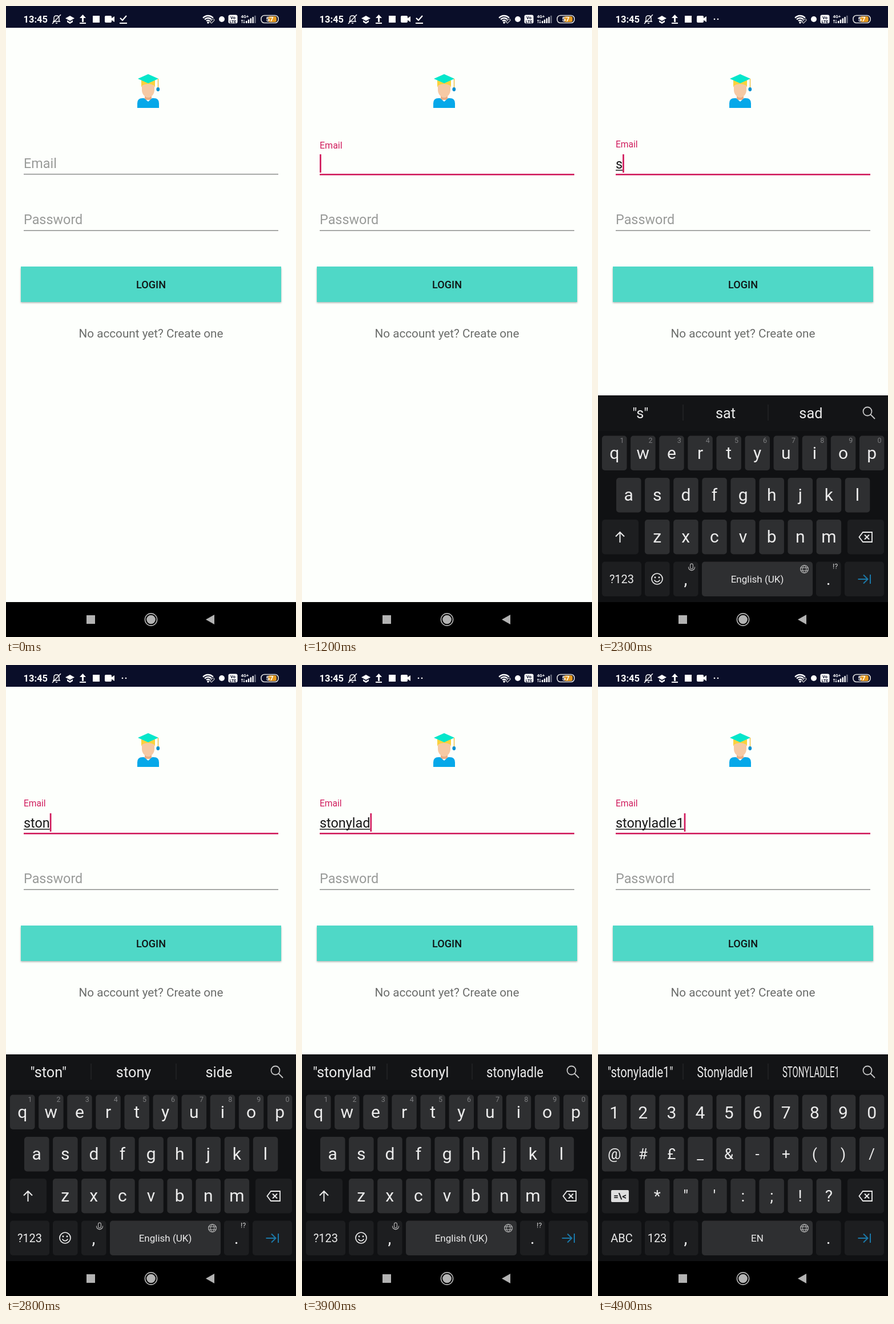
Write an HTML page with a canvas that moves like this. It is 508 px wide and 1102 px high and loops after 5000 ms.

```html
<!DOCTYPE html>
<html lang="en">
<head>
<meta charset="utf-8">
<title>Login</title>
<style>
html, body { margin: 0; width: 100%; height: 100%; overflow: hidden; background: #fdfffc; }
canvas { display: block; }
</style>
</head>
<body>
<canvas id="stage" width="508" height="1102"></canvas>
<script>
const ctx = document.getElementById('stage').getContext('2d');
const LOOP = 5000, STEP = 100;
const PINK = '#d01a5c', WHITE = '#fff', KEY = '#2e2f31', DARK_KEY = '#1d1e20', LETTER = '#ececec';
const WORD = 'stonyladle1';
const TYPED_AT = [2200, 2500, 2600, 2800, 3000, 3200, 3500, 3900, 4100, 4400, 4900];
const FOCUS = 1075, KEYBOARD = 1300, DOTS = 2100, SYMBOLS = 4600;

function text(s, x, y, size, color, align = 'left', weight = 400) {
  ctx.font = `${weight} ${size}px Roboto, sans-serif`;
  ctx.textAlign = align;
  ctx.fillStyle = color;
  ctx.fillText(s, x, y);
}
const center = (s, x, y, size, color = LETTER, weight) => text(s, x, y, size, color, 'center', weight);

function rect(x, y, w, h, color) {
  ctx.fillStyle = color;
  ctx.fillRect(x, y, w, h);
}
function fill(d, color) {
  ctx.fillStyle = color;
  ctx.fill(new Path2D(d));
}
function stroke(d, color, width = 2) {
  ctx.strokeStyle = color;
  ctx.lineWidth = width;
  ctx.stroke(new Path2D(d));
}
function box(x, y, w, h, r, color) {
  ctx.beginPath();
  ctx.roundRect(x, y, w, h, r);
  ctx.fillStyle = color;
  ctx.fill();
}
function circle(x, y, r, color, lineWidth) {
  ctx.beginPath();
  ctx.arc(x, y, r, 0, 7);
  ctx.fillStyle = ctx.strokeStyle = color;
  ctx.lineWidth = lineWidth;
  lineWidth ? ctx.stroke() : ctx.fill();
}

function statusBar(t) {
  rect(0, 0, 508, 38, '#0a0e29');
  text('13:45', 30.5, 29, 16.5, WHITE, 'left', 700);
  stroke('M82 27H95M84 27V21Q84 17 88.500 17Q93 17 93 21V27M87 30H90M81 31L96 15', WHITE, 1.4);
  fill('M104 21.500L112 17L120 21.500L112 26ZM107 25L112 28L117 25V28L112 31L107 28Z', WHITE);
  fill('M134.500 15L140 21H136V28H133V21H129ZM129 29H140V31H129Z', WHITE);
  box(152, 17, 12, 12, 0, WHITE);
  box(173, 17, 12, 12, 2, WHITE);
  fill('M184 22L190 18V28L184 24Z', WHITE);
  if (t < DOTS) stroke('M200 21L204 25L211 17M199 30H212', WHITE, 2.2);
  else [204, 210].forEach(x => circle(x, 23, 1.3, WHITE));

  for (const r of [4, 8, 12]) {
    ctx.beginPath();
    ctx.arc(354, 29, r, -2.4, -0.75);
    ctx.strokeStyle = WHITE;
    ctx.lineWidth = 2.4;
    ctx.stroke();
  }
  circle(354, 29, 1.8, WHITE);
  stroke('M357 28L362 23Q365 22 365 25L360 30Z', '#ccc', 1.1);
  circle(378, 23, 5, WHITE);
  box(389.5, 15.5, 16, 15, 3, WHITE);
  center('Vo', 397.5, 22.5, 7.5, '#0a0e29', 700);
  center('LTE', 397.5, 29.5, 7, '#0a0e29', 700);
  text('4G+', 411.5, 21, 7.5, WHITE, 'left', 700);
  stroke('M413.500 24V30M412 26L413.500 24L415 26M417 24V30M415.500 28L417 30L418.500 28', WHITE, 0.9);
  for (let i = 0; i < 5; i++) {
    const h = 4 + i * 2.3;
    rect(420 + i * 3.8, 30 - h, 2.4, h, i < 4 ? WHITE : '#6c6f80');
  }
  box(459, 18, 15, 10, 3, '#e59a20');
  ctx.beginPath();
  ctx.roundRect(447, 16.5, 30, 13, 5.5);
  ctx.strokeStyle = '#ddd';
  ctx.lineWidth = 1.6;
  ctx.stroke();
  center('57', 462, 27.2, 11.5, WHITE, 700);
}

function graduate() {
  fill('M237 130H261V140L259 144H239L237 140Z', '#fbd23c');
  fill('M243 152H255V164H243Z', '#e9ad86');
  fill('M238 139Q249 133 260 139V147C260 154 254 160 249 160C244 160 238 154 238 147Z', '#f6c9a4');
  fill('M230 178V170Q230 161 239 161H242L249 167L256 161H259Q268 161 268 170V178Z', '#06a8e9');
  fill('M249 119L267 127L249 135L231 127Z', '#05e6cb');
  stroke('M266.500 127V144', '#edbd3d', 1.4);
  ctx.beginPath();
  ctx.ellipse(266.3, 145.5, 2.9, 3.4, 0, 0, 7);
  ctx.fillStyle = '#0790cf';
  ctx.fill();
}

function emailField(t, typed) {
  const focused = t >= FOCUS;
  const p = Math.min(1, Math.max(0, (t - FOCUS) / 167));
  const lift = p * p * (3 - 2 * p) * (1 - p) + (1 - (1 - p) ** 3) * p;
  text('Email', 31, 282.5 - 35.5 * lift, 23.4 - 7.8 * lift, focused ? PINK : '#999b99');
  if (!focused) return rect(31, 293, 446, 1.4, '#858785');

  rect(31, 293, 446, 2.6, PINK);
  text(typed, 31, 284, 23.4, '#161616');
  const width = ctx.measureText(typed).width;
  rect(31, 286, width, 1.5, '#161616');
  const blinkedOff = t >= 1600 && t < 2100;
  if (!blinkedOff) rect(31 + width, 259, 2.7, 32, PINK);
}

function form(t, typed) {
  rect(0, 38, 508, 1003, '#fdfffc');
  graduate();
  emailField(t, typed);
  text('Password', 31, 381, 23.4, '#999b99');
  rect(31, 391.5, 446, 1.4, '#858785');
  ctx.save();
  ctx.shadowColor = 'rgba(0,0,0,.3)';
  ctx.shadowBlur = 3;
  ctx.shadowOffsetY = 1.5;
  rect(26, 455, 456, 62, '#4fd8c7');
  ctx.restore();
  center('LOGIN', 254, 493, 18.1, '#101414', 500);
  center('No account yet? Create one', 254, 578.5, 20.7, '#6b6d6b');
}

function suggestions(typed) {
  const n = typed.length;
  if (n > 9) {
    const capital = typed[0].toUpperCase() + typed.slice(1);
    return [capital, typed.toUpperCase()];
  }
  const early = [['sat', 'sad'], ['still', 'stay'], ['stop', 'story'], [WORD.slice(0, 5), 'side']];
  return early[n - 1] || [WORD.slice(0, 6), WORD.slice(0, 10)];
}

function microphone(x, y, k, color) {
  ctx.save();
  ctx.translate(x, y);
  ctx.scale(k, k);
  stroke('M-4 -6A4 4 0 0 1 4 -6V1A4 4 0 0 1 -4 1ZM-9 -1V1A9 8 0 0 0 9 1V-1M0 9V11', color, 1.7);
  ctx.restore();
}

function toolbar(typed) {
  rect(0, 680, 508, 62, '#131416');
  circle(472, 708, 7.5, '#c6c6c6', 1.8);
  stroke('M477.500 713.500L485 721', '#c6c6c6', 1.8);
  if (!typed) {
    for (const x of [25, 36]) for (const y of [701.5, 712.5]) {
      ctx.strokeStyle = '#c6c6c6';
      ctx.lineWidth = 1.7;
      ctx.strokeRect(x, y, 7, 7);
    }
    microphone(419.5, 710, 1, '#9c9c9c');
    return;
  }
  rect(148.5, 696, 1, 28, '#2c2d2f');
  rect(297.5, 696, 1, 28, '#2c2d2f');
  // Long words are condensed to the room in their slot.
  [`"${typed}"`, ...suggestions(typed)].forEach((word, i) => {
    ctx.font = '400 25.3px Roboto, sans-serif';
    const room = i ? 100 : 115;
    ctx.save();
    ctx.translate(74.3 + i * 149.3, 720);
    ctx.scale(Math.min(1, room / ctx.measureText(word).width), 1);
    center(word, 0, 0, 25.3);
    ctx.restore();
  });
}

const key = (x, y, w, color = KEY) => box(x, y, w, 60.5, 5, color);

function keyRow(chars, x, y, size, lift = 10) {
  [...chars].forEach((c, i) => {
    const left = x + i * 50.1;
    key(left, y, 43.5);
    center(c, left + 21.7, y + 30 + lift, size);
  });
}

function keyboard(symbols, typed) {
  rect(0, 680, 508, 361, '#101113');
  toolbar(typed);

  if (symbols) {
    keyRow('1234567890', 7, 750.5, 30, 11);
    keyRow('@#£_&-+()/', 7, 824, 26, 9);
    keyRow('*"\':;!?', 82, 897, 28);
  } else {
    keyRow('qwertyuiop', 7, 750.5, 30);
    for (let i = 0; i < 10; i++) center((i + 1) % 10, 42 + i * 50.1, 763, 12.5, '#7c7d7f');
    keyRow('asdfghjkl', 32, 824, 30);
    keyRow('zxcvbnm', 82, 897, 30);
  }

  key(7, 897, 64, DARK_KEY);
  key(437, 897, 64, DARK_KEY);
  if (symbols) {
    box(23, 917, 31, 21, 2, '#dedede');
    center('=\\<', 38.5, 932.5, 15, DARK_KEY, 700);
  } else {
    stroke('M38.500 937V919M31 926.500L38.500 919L46 926.500', LETTER, 2);
  }
  stroke('M464 919H480V936H464L457.500 927.500ZM467 923.500L475 931.500M475 923.500L467 931.500', LETTER, 1.8);

  key(7, 970.5, 69, DARK_KEY);
  key(82, 970.5, 43.5, DARK_KEY);
  key(132, 970.5, 43.5, DARK_KEY);
  key(182, 970.5, 194);
  key(382, 970.5, 43.5, DARK_KEY);
  key(432, 970.5, 69, DARK_KEY);
  center(symbols ? 'ABC' : '?123', 41.5, 1008, 20);
  center(',', 153.5, 1011, 30);
  center('.', 403.7, 1011, 30);
  center(symbols ? 'EN' : 'English (UK)', 279, 1007, 17);
  if (symbols) {
    center('123', 103.5, 1008, 20);
  } else {
    circle(103.5, 1000.5, 9.5, LETTER, 1.7);
    circle(100, 998, 1.4, LETTER);
    circle(107, 998, 1.4, LETTER);
    stroke('M98.500 1002.500Q103.500 1009 108.500 1002.500', LETTER, 1.6);
    microphone(164, 980, 0.6, '#c6c6c6');
    center('!?', 415.5, 983, 12.5, '#d0d0d0');
  }
  circle(361.5, 983.5, 6.8, '#c0c0c0', 1.1);
  stroke('M354.700 981H368.300M354.700 986H368.300M361.500 976.700C357 981 357 986 361.500 990.300C366 986 366 981 361.500 976.700', '#c0c0c0', 1);
  stroke('M455.500 1001H472.500M465 993.500L472.500 1001L465 1008.500M477 993V1009', '#1b78a8', 2);
}

function navigationBar() {
  rect(0, 1041, 508, 61, '#000');
  rect(141, 1064, 15, 15, '#b3b3b3');
  circle(254, 1071.5, 10.6, '#b3b3b3', 1.6);
  circle(254, 1071.5, 7.8, '#b3b3b3');
  fill('M350 1071.500L365 1063V1080Z', '#b3b3b3');
}

function draw() {
  const t = Math.floor(performance.now() % LOOP / STEP) * STEP;
  const typed = WORD.slice(0, TYPED_AT.filter(at => t >= at).length);
  form(t, typed);
  if (t >= KEYBOARD) keyboard(t >= SYMBOLS, typed);
  statusBar(t);
  navigationBar();
  requestAnimationFrame(draw);
}
draw();
</script>
</body>
</html>
```
